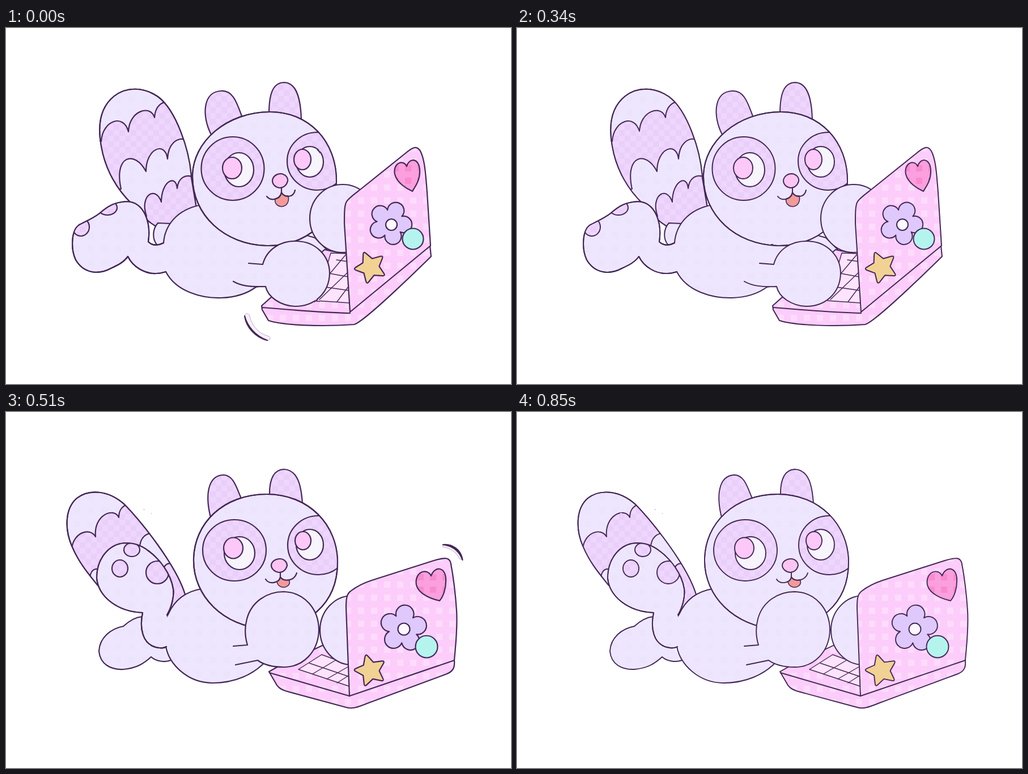
Recreate the animation shown at these times as an HTML page. Size 891 by 628 pixels, loop 1020 ms.

```html
<!DOCTYPE html>
<html lang="en">
<head>
<meta charset="utf-8">
<title>Typing tanuki</title>
<style>
  html, body { margin: 0; width: 100%; height: 100%; overflow: hidden; background: #fff; }
  svg { display: block; width: 891px; height: 628px; }
</style>
</head>
<body>
<svg id="stage" viewBox="0 0 891 628" xmlns="http://www.w3.org/2000/svg"></svg>
<script>
const INK = '#432756';
const STEP = 170;
const STEPS = 6;
const WIDTHS = [2.2, 1.9, 2, 2.2, 2.1, 1.9];

const path = (d, fill = 'none', extra = '') => `<path d="${d}" fill="${fill}" ${extra}/>`;
const oval = ([x, y, rx, ry = rx], fill, extra = '') =>
  `<ellipse cx="${x}" cy="${y}" rx="${rx}" ry="${ry}" fill="${fill}" ${extra}/>`;
const clip = (id, d) => `<clipPath id="${id}"><path d="${d}"/></clipPath>`;
const clipped = (id, body) => `<g clip-path="url(#${id})">${body}</g>`;

// Soft gingham fills: one square per tile, or two for a full checkerboard.
function gingham(id, base, tint, tile, size, two) {
  const sq = (x, y) => `<rect x="${x}" y="${y}" width="${size}" height="${size}" fill="${tint}"/>`;
  return `<pattern id="${id}" width="${tile}" height="${tile}" patternUnits="userSpaceOnUse">
    <rect width="${tile}" height="${tile}" fill="${base}"/>${sq(0, 0)}${two ? sq(size, size) : ''}</pattern>`;
}

const FUR = 'url(#fur)', PLUM = 'url(#plum)', PINK = 'url(#pink)', ROSE = 'url(#rose)';

const polar = (x, y, r, deg) => {
  const a = deg * Math.PI / 180;
  return [x + r * Math.cos(a), y + r * Math.sin(a)];
};
const pt = p => p.map(v => v.toFixed(1)).join(' ');

function flower(x, y, r, turn) {
  let d = '';
  for (let i = 0; i <= 5; i++) {
    const at = pt(polar(x, y, r * .62, turn + 36 + i * 72));
    d += i ? `A${r * .385} ${r * .385} 0 1 1 ${at}` : `M${at}`;
  }
  return d + 'Z';
}

// Five points with rounded tips.
function star(x, y, r, turn) {
  const mix = (a, b) => pt(a.map((v, k) => v + (b[k] - v) * .72));
  let d = '';
  for (let i = 0; i < 5; i++) {
    const a = turn + i * 72;
    const tip = polar(x, y, r, a);
    const before = polar(x, y, r * .5, a - 36), after = polar(x, y, r * .5, a + 36);
    d += `${i ? 'L' : 'M'}${pt(before)}L${mix(before, tip)}Q${pt(tip)} ${mix(after, tip)}`;
  }
  return d + 'Z';
}

const poses = [{
  id: 'a',
  tail: 'M327 264C324 215 300 145 268 121C243 104 213 103 191 120C167 139 161 170 168 208C175 250 196 285 222 310C238 328 250 344 276 356L336 318Z',
  bands: [
    'M168 200C170 163 208 150 216 183C217 146 255 134 262 158C263 138 276 128 286 132L400 300L200 420L130 230Z',
    'M203 284C190 226 226 214 247 253C247 212 281 199 285 231C286 204 302 192 317 197L400 300L200 420L170 290Z',
    'M248 332C235 295 264 277 274 307C274 270 300 257 302 283C304 264 317 257 330 263L400 300L260 420L220 330Z'],
  ears: ['M362 188C345 155 347 112 380 111C402 110 408 135 417 158', 'M464 152C464 118 470 97 490 96C513 96 520 125 521 162'],
  head: 'M466 148C535 148 583 200 583 270C583 340 530 385 460 384C385 382 329 330 329 262C329 200 390 148 466 148Z',
  patches: [[400, 248, 55.5, 56], [549, 235, 53, 51]],
  whites: [[411, 250, 26, 30], [536, 236, 24, 27]],
  pupils: [[399, 247, 17, 19], [523, 232, 15, 18]],
  nose: 'M470 269C471 261 478 257 485 257C493 258 498 264 497 270C495 278 489 282 483 282C475 281 470 276 470 269Z',
  tongue: 'M475 301C473 310 480 315 487 315C496 314 500 306 498 296Q489 297 486 290Q483 300 475 301Z',
  mouth: 'M486 282L486 291M460 297C467 306 484 303 486 290C490 299 507 301 510 286',
  far: 'M268 344C258 355 258 372 266 382L280 382L290 345Z',
  body: 'M345 312C300 320 280 350 278 379C268 390 268 420 282 430C300 465 345 477 380 476C410 475 430 465 441 457L530 440L566 391L545 370Z',
  leg: 'M278 379C268 384 258 384 251 377C256 345 245 307 213 306C192 307 180 314 165 327C152 337 138 342 128 348C115 358 114 390 123 409C137 433 163 436 185 424C198 418 208 413 215 403C224 422 246 434 265 433C274 433 278 431 282 430',
  toes: [[179, 317, 17, 13], [132, 351, 15, 16]],
  base: 'M451 490L562 391L605 400L748 383L750 403C700 452 628 520 614 523C560 527 490 525 463 516L452 497Z',
  rim: 'M452 493C500 497 560 502 607 503',
  keys: 'M573 397L604 398L606 485L548 481Z',
  grid: 'M583 409L603 412M571 433L604 439M563 457L605 463M601 398L565 441M604 430L553 479M605 455L584 483',
  farHand: [594, 336, 58, 60],
  lid: 'M607 501L597 345C597 325 597 312 601 306C605 300 612 295 625 285L706 220C718 210 725 207 731 217C738 230 740 250 743 290L749 384Z',
  heart: 'M686 258C682 238 701 231 707 244C711 229 728 228 730 250C731 268 722 280 717 288C708 284 690 274 686 258Z',
  flower: [678, 344, 38, -66],
  eyelet: [680, 347, 10],
  bead: [718, 372, 18.5],
  star: [643, 422, 31, -114],
  hand: 'M428 415L453 417C460 390 485 375 513 376C548 377 571 403 571 433C570 467 545 491 510 491C485 490 462 475 458 456C430 457 415 455 401 447'
}, {
  id: 'b',
  tail: 'M316 322C300 270 240 195 209 163C180 137 146 136 125 152C103 171 104 208 116 236C128 265 145 285 162 306L215 320L262 362L292 356Z',
  bands: [
    'M116 240C120 212 148 203 158 220C154 182 190 167 199 186C199 174 205 166 214 163L350 300L200 420L90 250Z',
    'M148 292C150 276 162 270 175 288L236 240C236 222 248 210 264 216L350 300L200 420L120 300Z',
    'M250 330L277 282C278 270 285 264 296 269L350 300L270 420Z'],
  ears: ['M361 186C352 150 354 112 384 111C404 112 408 140 417 156', 'M465 150C464 120 472 102 490 101C515 102 521 130 523 162'],
  head: 'M460 145C535 145 585 200 585 265C585 340 530 383 458 383C383 378 331 325 331 262C331 195 385 145 460 145Z',
  patches: [[403, 244, 56, 54], [551, 235, 54, 52]],
  whites: [[412, 249, 27, 29], [536, 234, 24, 27]],
  pupils: [[401, 240, 17, 18.5], [524, 227, 14, 16]],
  nose: 'M468 270C469 263 476 259 483 259C491 259 496 265 496 271C494 279 488 283 482 283C474 282 468 277 468 270Z',
  tongue: 'M478 299C479 307 486 310 492 309C500 307 502 301 499 296Q488 298 484 291Q483 298 478 299Z',
  mouth: 'M484 283L484 292M458 295C464 305 482 302 484 291C489 300 508 299 513 284',
  far: 'M240 361C228 362 218 368 207 378C185 382 165 398 164 422C166 445 185 455 207 454C230 452 243 444 256 432C265 440 280 442 291 438',
  body: 'M345 312C320 316 298 330 286 357C270 380 270 400 282 414C288 445 320 478 365 478C405 478 435 462 452 446L470 430L500 380Z',
  leg: 'M284 358C292 345 297 325 295 312C291 285 270 258 250 244C240 236 225 231 210 231C180 233 160 260 160 293C163 325 195 352 241 354C236 378 238 412 270 416C277 417 280 416 283 414',
  toes: [[222, 243, 14, 12], [201, 276, 14, 15], [267, 283, 20, 20]],
  base: 'M464 458L480 449L562 410L610 430L791 438C792 450 790 458 775 463L640 513C618 522 610 524 600 521L500 494C488 491 482 488 478 482Z',
  rim: 'M465 460L606 501',
  keys: 'M516 454L557 428L606 446L606 484Z',
  grid: 'M535 443L606 467M583 437L541 462M606 448L566 471M606 464L584 478',
  farHand: [611, 385, 57, 61],
  lid: 'M606 501L600 345C600 330 601 321 608 316C617 309 630 302 645 297L755 262C775 256 783 256 785 268C790 295 793 320 795 350C797 385 793 412 791 438Z',
  heart: 'M724 305C720 282 743 274 750 289C756 272 774 272 776 293C777 312 771 326 765 333C752 330 728 322 724 305Z',
  flower: [701, 382, 41, -84],
  eyelet: [702, 383, 10.5],
  bead: [742, 414, 19.5],
  star: [643, 456, 31, -106],
  hand: 'M401 413L426 411C421 395 421 380 425 365C433 335 460 317 490 317C527 318 552 348 552 385C551 422 525 450 490 450C470 450 455 446 444 438L405 446'
}];

function draw(p) {
  const tailClip = p.id + 'Tail', headClip = p.id + 'Head', legClip = p.id + 'Leg';
  return `<g id="${p.id}">` +
    clip(tailClip, p.tail) + clip(headClip, p.head) + clip(legClip, p.leg) +
    path(p.tail, FUR) +
    clipped(tailClip, p.bands.map((d, i) => path(d, i % 2 ? FUR : PLUM)).join('')) +
    path(p.tail) +
    path(p.far, FUR) +
    path(p.body, FUR) +
    path(p.leg, FUR) +
    clipped(legClip, p.toes.map(t => oval(t, PLUM)).join('')) +
    path(p.leg) +
    p.ears.map(d => path(d, PLUM)).join('') +
    path(p.head, FUR) +
    clipped(headClip, p.patches.map(t => oval(t, PLUM)).join('')) +
    path(p.head) +
    p.whites.map(t => oval(t, '#f7f4fb')).join('') +
    p.pupils.map(t => oval(t, '#fcc8f8')).join('') +
    path(p.tongue, '#f29a9b', 'stroke-width="1.6"') +
    path(p.mouth) +
    path(p.nose, '#fbc5f2') +
    path(p.base, PINK) +
    path(p.keys, '#fde3fb', 'stroke-width="1.4"') +
    path(p.grid, 'none', 'stroke-width="1.4"') +
    oval(p.farHand, FUR) +
    path(p.lid, PINK) +
    path(p.rim) +
    path(p.heart, ROSE) +
    path(flower(...p.flower), '#dfc8fb') +
    oval(p.eyelet, '#fdf8ff') +
    oval(p.bead, '#b5f4ee') +
    path(star(...p.star), '#f2d194') +
    path(p.hand, FUR) +
    '</g>';
}

const PALE = 'stroke="#a99ab2" stroke-width=".8"';
const swoosh =
  '<g id="low">' +
  path('M421 508C423 501 429 503 430 509C435 527 447 540 464 544C468 547 466 551 461 551C440 546 424 528 421 508Z', '#f8f0fa', PALE) +
  path('M421 508C424 528 440 546 461 551C440 543 426 527 421 508Z', INK) + '</g>' +
  '<g id="high">' +
  path('M771 238C785 240 796 249 800 259L805 260C803 245 787 233 771 234Z', '#f8f0fa', PALE) +
  path('M771 234C787 232 803 243 805.5 261C800 246 788 236 771 234Z', INK) + '</g>' +
  '<g id="flecks" fill="#b9aec4" stroke="none"><circle cx="243.5" cy="172" r=".9"/><circle cx="256.5" cy="179" r=".8"/></g>';

const stage = document.getElementById('stage');
stage.innerHTML = `<defs>
  ${gingham('fur', '#eee6fe', '#ebe4fa', 24, 11)}
  ${gingham('plum', '#eed6fc', '#e9cffa', 20, 10, true)}
  ${gingham('pink', '#fccdfa', '#fddbfc', 23, 11)}
  ${gingham('rose', '#fb9fde', '#f88bd1', 22, 11)}
  <filter id="boil" filterUnits="userSpaceOnUse" x="0" y="0" width="891" height="628" color-interpolation-filters="sRGB">
    <feTurbulence id="sway" type="fractalNoise" baseFrequency=".03" numOctaves="1" result="slow"/>
    <feDisplacementMap in="SourceGraphic" in2="slow" scale="1.6" xChannelSelector="R" yChannelSelector="G" result="bent"/>
    <feTurbulence id="grain" type="fractalNoise" baseFrequency=".35" numOctaves="1" result="fine"/>
    <feDisplacementMap in="bent" in2="fine" scale="1.4" xChannelSelector="R" yChannelSelector="G"/>
  </filter></defs>
  <g id="art" filter="url(#boil)" stroke="${INK}" stroke-linecap="round" stroke-linejoin="round">
  ${poses.map(draw).join('')}${swoosh}</g>`;

const get = id => document.getElementById(id);
const show = (id, on) => get(id).setAttribute('display', on ? 'inline' : 'none');
let last = -1;

function update(ms) {
  const n = Math.floor(ms / STEP) % STEPS;
  if (n === last) return;
  last = n;
  show('a', n < 3);
  show('b', n >= 3);
  show('low', n === 0);
  show('high', n === 3 || n === 4);
  show('flecks', n >= 3);
  get('art').setAttribute('stroke-width', WIDTHS[n]);
  get('sway').setAttribute('seed', n + 2);
  get('grain').setAttribute('seed', n + 20);
}

const start = performance.now();
function tick() {
  update(performance.now() - start);
  requestAnimationFrame(tick);
}
update(0);
requestAnimationFrame(tick);
</script>
</body>
</html>
```
